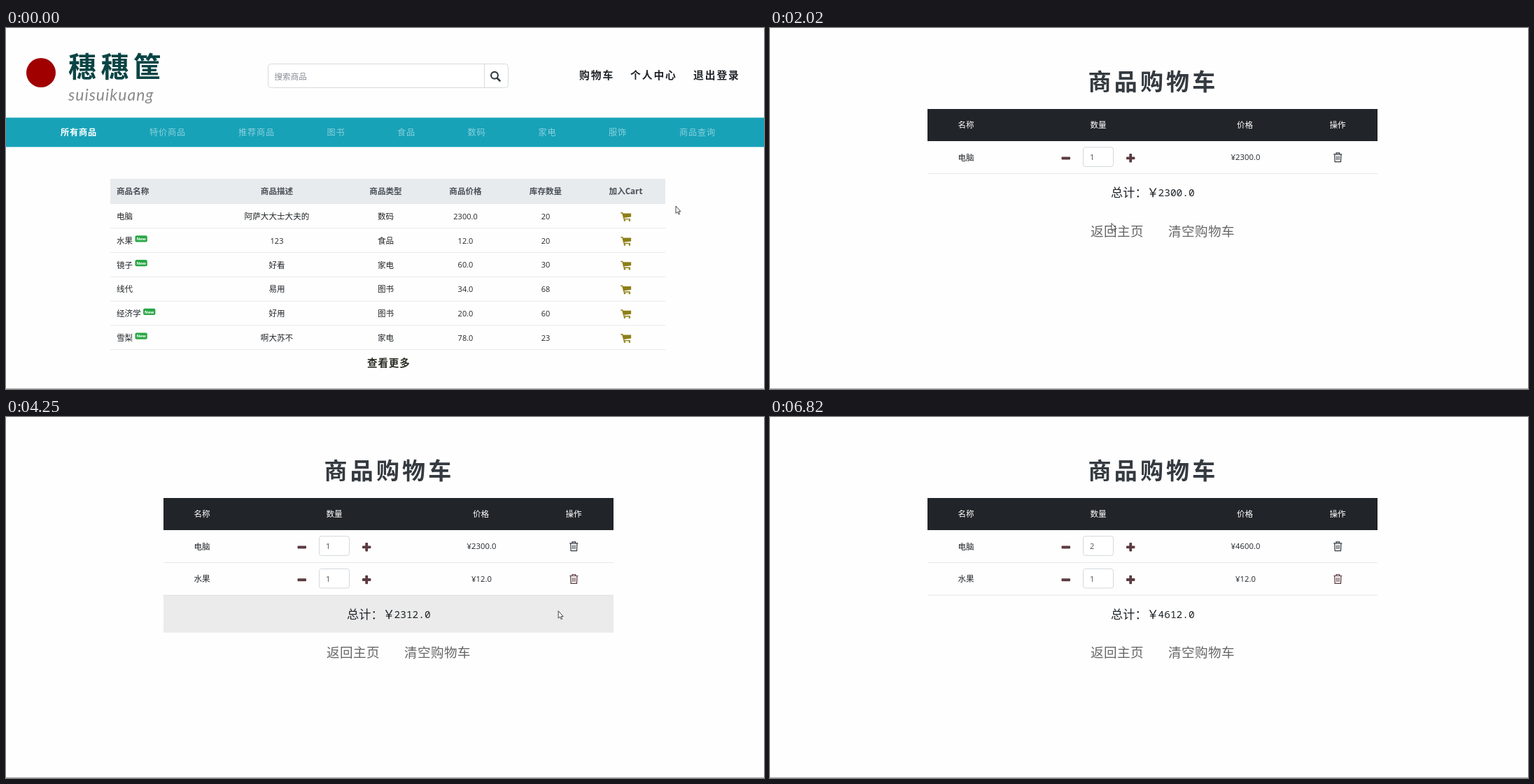
An HTML page for the animation above (7.29 s loop, 1083 px wide and 517 px high).

```html
<!DOCTYPE html>
<html lang="zh-CN">
<head>
<meta charset="utf-8">
<title>商品购物车</title>
<style>
  html, body { margin: 0; width: 100%; height: 100%; overflow: hidden; background: #fefefe; }
  svg { display: block; font-family: "Open Sans", "Noto Sans CJK SC", "Noto Sans CJK", sans-serif; }
  text { white-space: pre; }
  .mid { text-anchor: middle; }
  .bold { font-weight: 700; }
  .semi { font-weight: 500; }
  .brush { font-family: "Noto Sans CJK SC", "Noto Sans CJK", sans-serif; }
  .thin { font-weight: 300; }
  .mono { font-family: "Noto Sans Mono", monospace; }
  .latin { font-family: Lato, sans-serif; font-style: italic; letter-spacing: 1px; }
  .row { fill: #000; fill-opacity: 0; }
  .row.on { fill-opacity: .075; }
  .cart { color: #8d7f16; }
  .cart.on { color: #0056b3; }
  #back { fill: #666; }
  #back.on { fill: #0056b3; }
  .off { display: none; }
</style>
</head>
<body>
<svg id="stage" width="1083" height="517" viewBox="0 0 1083 517">
  <defs>
    <g id="trolley">
      <path d="M-7.3 -5.2H-4.8L-2.4 3.6H6.4" fill="none" stroke="currentColor" stroke-width="1.4"/>
      <path d="M-4.4 -4.4H7.6V.6L-3 1.9Z" fill="currentColor"/>
      <circle cx="-1.6" cy="5.6" r="1.3" fill="currentColor"/>
      <circle cx="5.4" cy="5.6" r="1.3" fill="currentColor"/>
    </g>
    <g id="bin" fill="none" stroke="currentColor">
      <path d="M-6 -4.5H6M-2.3 -4.8V-6.5H2.3V-4.8M-4.6 -4.5L-4.2 6.3H4.2L4.6 -4.5" stroke-width="1.2"/>
      <path d="M-2 -2V4M0 -2V4M2 -2V4" stroke-width=".9"/>
    </g>
  </defs>
  <g id="home"></g>
  <g id="basket"></g>
  <rect y="516" width="1083" height="1" fill="#a9a9a9"/>
  <g id="pointer" fill="#fff" stroke="#333" stroke-width=".9" stroke-linejoin="round">
    <path id="arrow" d="M0 0V10.4L2.4 8.3L4.1 12L5.6 11.3L4 7.8H7Z"/>
    <path id="hand" d="M-1.2 8V1Q0 -.6 1.2 1V5Q2.4 4.2 3 5.4Q4.2 4.8 4.6 6Q5.6 5.8 5.6 7.2V10.2L4.4 14H-1.2L-3.8 9.4Q-3.8 7.4 -2.2 8.2L-1.2 9.4Z"/>
  </g>
</svg>
<script>
const LOOP = 7290, DARK = '#212529', MAROON = '#5b3a40';
const ROW = 34.8, TOP = 252, LINE = 46.7, HEAD = 162;
const $ = id => document.getElementById(id);

// Text placed by its vertical centre
const label = (x, cy, s, size, fill, cls = '', extra = '') =>
  `<text x="${x}" y="${cy + size * .37}" font-size="${size}" fill="${fill}" class="${cls}" ${extra}>${s}</text>`;
const spaced = (x, cy, s, size, gap, fill, cls = '', extra = '') =>
  label(x, cy, s, size, fill, 'brush ' + cls, `letter-spacing="${gap}" ${extra}`);
const box = (x, y, w, h, fill, extra = '') =>
  `<rect x="${x}" y="${y}" width="${w}" height="${h}" fill="${fill}" ${extra}/>`;

function homePage() {
  const cols = [387, 542.5, 656.5, 771];
  const goods = [
    ['电脑', '阿萨大大士大夫的', '数码', '2300.0', '20'],
    ['水果', '123', '食品', '12.0', '20', 1],
    ['镜子', '好看', '家电', '60.0', '30', 1],
    ['线代', '易用', '图书', '34.0', '68'],
    ['经济学', '好用', '图书', '20.0', '60', 1],
    ['雪梨', '啊大苏不', '家电', '78.0', '23', 1]];
  const nav = [['所有商品', 78], ['特价商品', 205], ['推荐商品', 332], ['图书', 458.5], ['食品', 559],
    ['数码', 659.5], ['家电', 760.5], ['服饰', 861], ['商品查询', 962]];

  let out = `<g id="logo"><circle cx="50" cy="64" r="21" fill="#a00000"/>`
    + spaced(89, 55, '穗穗筐', 40, 6.5, '#0b4444', 'bold')
    + `<text x="89" y="104" font-size="23" fill="#8a8a8a" class="latin">suisuikuang</text></g>`
    + box(374.5, 51.5, 343, 34, '#fff', 'rx="4" stroke="#d6dade"')
    + box(683, 52, 1, 33, '#d6dade')
    + label(383.5, 69.5, '搜索商品', 11.6, '#868e96')
    + '<path d="M702 72L705.5 75.5" stroke="#343a40" stroke-width="2.6" stroke-linecap="round"/>'
    + '<circle cx="698" cy="67.8" r="4.9" fill="none" stroke="#343a40" stroke-width="2.1"/>';
  [['购物车', 819], ['个人中心', 892], ['退出登录', 982]].forEach(([s, x]) =>
    out += spaced(x, 68, s, 14.8, 1.9, DARK, 'bold'));

  out += box(0, 128.4, 1083, 42, '#17a2b8');
  nav.forEach(([s, x], i) =>
    out += spaced(x, 149, s, 12.2, .8, i ? '#8bd0db' : '#fff', i ? 'semi' : 'bold'));

  out += box(149, 216, 793, 36, '#e8ebee') + label(158, 234, '商品名称', 11.6, '#495057', 'bold');
  ['商品描述', '商品类型', '商品价格', '库存数量', '加入Cart'].forEach((s, i) =>
    out += label(cols[i] || 885.5, 234, s, 11.6, '#495057', 'bold mid'));

  goods.forEach(([name, ...cells], i) => {
    const y = TOP + ROW * i, cy = y + 17.7;
    out += `<rect class="row" x="149" y="${y}" width="793" height="${ROW}"/>`
      + box(149, y + ROW - .6, 793, 1, '#e6e9ec')
      + label(158, cy, name, 11.6, DARK);
    cols.forEach((x, c) =>
      out += label(x, cy, cells[c], /\d/.test(cells[c]) ? 11 : 11.6, DARK, 'mid'));
    if (cells[4]) {
      const x = 161.3 + 11.6 * name.length;
      out += box(x, cy - 7.2, 17.3, 9.2, '#28a745', 'rx="2"')
        + label(x + 8.65, cy - 2.6, 'New', 6, '#fff', 'bold mid');
    }
    out += `<use href="#trolley" class="cart" x="885.5" y="${cy + .3}"/>`;
  });
  return out + spaced(516, 480, '查看更多', 14.6, .8, '#2b2b22', 'bold');
}

function basketPage() {
  let out = spaced(454.5, 77, '商品购物车', 33, 4.2, '#343a40', 'bold')
    + box(225, 116, 643, 46, DARK);
  [['名称', 280], ['数量', 469], ['价格', 678.5], ['操作', 811]].forEach(([s, x]) =>
    out += label(x, 139, s, 11.6, '#fff', 'mid semi'));

  [['电脑', '2300.0', '#343a40'], ['水果', '12.0', MAROON]].forEach(([name, price, ink], i) => {
    const y = HEAD + LINE * i;
    out += `<g id="item${i}" transform="translate(0 ${y})">`
      + `<rect class="row" x="225" width="643" height="${LINE}"/>`
      + box(225, 46, 643, 1, '#e4e7ea')
      + label(280, 23.3, name, 11.6, DARK, 'mid')
      + (i ? '' : box(493, 10.5, 38, 28, '#e6eaf0', 'id="ring" rx="3" stroke="#b9d0ec"'))
      + box(416.5, 22.5, 12.5, 4, MAROON, 'rx="1"')
      + box(447.5, 8.8, 43, 27.5, '#fff', 'rx="3" stroke="#d3d8dd"')
      + label(457, 23.3, '1', 11, '#495057', '', `id="qty${i}"`)
      + box(509, 22.4, 12.4, 3.8, MAROON, 'rx="1"')
      + box(513.3, 18.1, 3.8, 12.4, MAROON, 'rx="1"')
      + label(679.5, 23.3, '¥' + price, 11.3, DARK, 'mid', `id="price${i}"`)
      + `<use href="#bin" x="811.3" y="23.3" color="${ink}"/></g>`;
  });

  return out + '<g id="foot"><rect class="row" x="225" width="643" height="53.5"/>'
    + label(487, 26.8, '总计：￥', 17.2, DARK, 'brush thin')
    + label(554.5, 26.8, '', 14.5, DARK, 'mono', 'id="sum"')
    + spaced(458, 82, '返回主页', 18.6, .4, '', 'thin', 'id="back"')
    + spaced(569, 82, '清空购物车', 18.6, .4, '#666', 'thin') + '</g>';
}

$('home').innerHTML = homePage();
$('basket').innerHTML = basketPage();
const homeRows = [...$('home').querySelectorAll('.row')];
const carts = [...$('home').querySelectorAll('.cart')];
const basketRows = [...$('basket').querySelectorAll('.row')];

// Pointer path: time, x, y
const path = [
  [0, 957, 255], [40, 957, 255], [300, 915, 261], [550, 880, 263], [690, 880, 263], [790, 883, 271],
  [1710, 883, 271], [1800, 840, 258], [1900, 645, 248], [1960, 545, 261], [2020, 488, 279.5],
  [2110, 485, 289], [2270, 489, 293], [2750, 489, 293], [2950, 620, 360], [3100, 770, 370],
  [3250, 880, 325], [3360, 886, 310], [3620, 886, 310], [3630, 885, 312], [4080, 885, 312],
  [4250, 790, 278], [4420, 645, 238], [4600, 545, 198], [4760, 522, 186], [5250, 522, 186],
  [5500, 535, 225], [5730, 553, 283], [5820, 559, 293], [6000, 640, 330], [6250, 810, 405],
  [6480, 916, 450], [6530, 916, 450], [6820, 1062, 520], [LOOP, 1062, 520]];
const handTimes = [[440, 990], [2080, 2470], [3290, 3630], [4700, 4880]];

function pointerAt(t) {
  const i = Math.max(1, path.findIndex(p => p[0] > t));
  const [a, ax, ay] = path[i - 1], [b, bx, by] = path[i];
  const k = (t - a) / (b - a);
  return [ax + (bx - ax) * k, ay + (by - ay) * k];
}
const show = (id, on) => $(id).classList.toggle('off', !on);
const light = (el, on) => el.classList.toggle('on', on);

function draw(t) {
  const [x, y] = pointerAt(t);
  const hand = handTimes.some(([a, b]) => t >= a && t < b);
  const atHome = t < 1270 || (t >= 2470 && t < 3630);
  show('home', atHome);
  show('basket', !atHome);
  show('hand', hand);
  show('arrow', !hand);
  show('pointer', t < 6820);
  $('pointer').setAttribute('transform', `translate(${x} ${y})`);

  if (atHome) {
    show('logo', t < 1270 || t >= 2770);
    const over = x > 149 && x < 942 ? Math.floor((y - TOP) / ROW) : -1;
    homeRows.forEach((r, i) => light(r, i === over));
    carts.forEach((c, i) => light(c, i === over && Math.abs(x - 885.5) < 9.5));
    return;
  }
  const count = t < 2470 ? 1 : 2, qty = t < 5140 ? 1 : 2;
  const footTop = HEAD + LINE * count, total = 2300 * qty + (count > 1 ? 12 : 0);
  show('item1', count > 1);
  show('ring', t >= 4740 && t < 5140);
  $('foot').setAttribute('transform', `translate(0 ${footTop})`);
  $('qty0').textContent = qty;
  $('price0').textContent = `¥${2300 * qty}.0`;
  $('sum').textContent = `${total}.0`;
  const inside = x > 225 && x < 868;
  const tops = [HEAD, HEAD + LINE, footTop], heights = [LINE, LINE, 53.5];
  basketRows.forEach((r, i) =>
    light(r, inside && y >= tops[i] && y < tops[i] + heights[i]));
  light($('back'), hand && t < 2470);
}

const start = performance.now();
function tick() {
  draw((performance.now() - start) % LOOP);
  requestAnimationFrame(tick);
}
tick();
</script>
</body>
</html>
```
